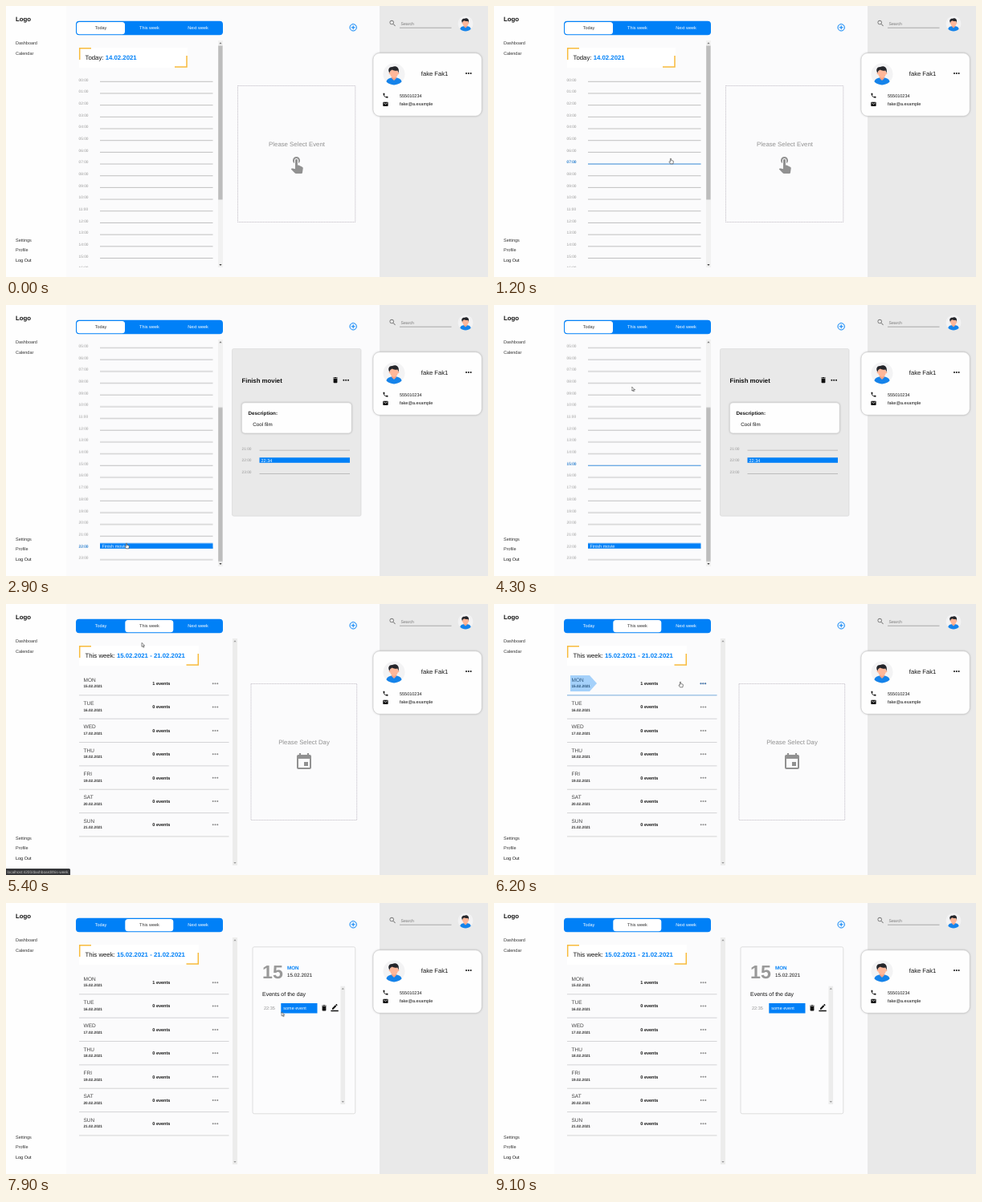
Write an HTML page that moves like this. It is 600 by 338 pixels and loops after 9.9 s.

```html
<!DOCTYPE html>
<html lang="en">
<head>
<meta charset="utf-8">
<title>Event planner</title>
<style>
html, body { margin: 0; width: 100%; height: 100%; overflow: hidden; background: #fbfbfc; }
svg { display: block; width: 600px; height: 338px; }
text { font: 5.5px "Liberation Sans", Arial, sans-serif; fill: #333; text-rendering: geometricPrecision; }
.b { font-weight: bold; }
.t { font-size: 7.8px; }
.m { font-size: 6.25px; }
.hr { font-size: 4.8px; fill: #999; }
.mid { text-anchor: middle; }
.blue { fill: #0080f7; }
.white { fill: #fff; }
.dim { fill: #919191; }
.k, text.k { fill: #111; }
.rule { stroke: #b2b2b2; stroke-width: .8; }
.corner { fill: none; stroke: #f8bb3c; stroke-width: 1.5; }
.dash { fill: none; stroke: #b9b4bd; stroke-width: .7; stroke-dasharray: 1.3 .7; }
.hot .hr { fill: #0080f7; }
.hot .rule { stroke: #2b95f5; }
.soft { filter: drop-shadow(0 .3px .8px #0003); }

.an { animation: 9.9s step-end infinite; }
.today { animation-name: today; }
.week { animation-name: week; }
.pickEvent { animation-name: pickEvent; }
.event { animation-name: event; }
.pickDay { animation-name: pickDay; }
.day { animation-name: day; }
.status { animation-name: status; }
.hand { animation-name: hand; }
.arrow { animation-name: arrow; }
.move { animation: move 9.9s linear infinite; }
.scroll { animation: scroll 9.9s ease-in-out infinite; }
.thumb { animation: thumb 9.9s ease-in-out infinite; }
.h0 { animation: mon 9.9s linear infinite; }
.h1 { animation: tue 9.9s linear infinite; }
.h2 { animation: wed 9.9s linear infinite; }

@keyframes today { 0% { opacity: 1 } 49.4%, 100% { opacity: 0 } }
@keyframes week { 0% { opacity: 0 } 49.4%, 100% { opacity: 1 } }
@keyframes pickEvent { 0% { opacity: 1 } 23.2%, 100% { opacity: 0 } }
@keyframes event { 0% { opacity: 0 } 23.2%, 100% { opacity: 1 } }
@keyframes pickDay { 0% { opacity: 1 } 64.6%, 100% { opacity: 0 } }
@keyframes day { 0% { opacity: 0 } 64.6%, 100% { opacity: 1 } }
@keyframes status { 0% { opacity: 0 } 47.4% { opacity: 1 } 57.5%, 100% { opacity: 0 } }
@keyframes hand {
  0% { opacity: 0 } 6% { opacity: 1 } 39.3% { opacity: 0 } 46.4% { opacity: 1 }
  52.5% { opacity: 0 } 57.5% { opacity: 1 } 69.2%, 100% { opacity: 0 }
}
@keyframes arrow {
  0% { opacity: 0 } 39.3% { opacity: 1 } 46.4% { opacity: 0 } 52.5% { opacity: 1 }
  57.5% { opacity: 0 } 69.2% { opacity: 1 } 89.8%, 100% { opacity: 0 }
}
@keyframes move {
  0%, 6% { transform: translate(238px, 228px) }
  10.6%, 18.2% { transform: translate(220px, 190px) }
  22.2%, 37.4% { transform: translate(150px, 297px) }
  42.4% { transform: translate(168px, 196px) }
  43.3%, 44.4% { transform: translate(171.5px, 102px) }
  47.4%, 51.5% { transform: translate(176px, 27px) }
  54.4%, 55.6% { transform: translate(169px, 48.3px) }
  59.6%, 65.6% { transform: translate(232px, 97px) }
  67.7% { transform: translate(258px, 128px) }
  68.7% { transform: translate(270px, 157px) }
  69.6%, 73.7% { transform: translate(301px, 171.5px) }
  80.8%, 85% { transform: translate(350px, 130px) }
  89.8%, 100% { transform: translate(440px, 30px) }
}
@keyframes scroll { 0%, 13.1% { transform: none } 16.1%, 100% { transform: translateY(-114.3px) } }
@keyframes thumb { 0%, 13.1% { transform: none } 16.1%, 100% { transform: translateY(78.3px) } }
@keyframes mon { 0%, 58% { opacity: 0 } 61%, 65.6% { opacity: 1 } 69.6%, 70.7% { opacity: .27 } 72%, 100% { opacity: 0 } }
@keyframes tue { 0%, 66% { opacity: 0 } 68% { opacity: 1 } 69.6%, 70.7% { opacity: .65 } 74%, 100% { opacity: 0 } }
@keyframes wed { 0%, 67.7% { opacity: 0 } 69.6%, 70.7% { opacity: 1 } 76%, 100% { opacity: 0 } }
/* hour highlights, each started by its own delay */
@keyframes flash { 0%, .8% { opacity: 1 } 1.1%, 100% { opacity: 0 } }
@keyframes linger { 0%, 2.3% { opacity: 1 } 3%, 100% { opacity: 0 } }
@keyframes rest { 0%, 8% { opacity: 1 } 8.6%, 100% { opacity: 0 } }
</style>
</head>
<body>
<svg viewBox="0 0 600 338">
  <defs>
    <clipPath id="view"><rect x="80" y="43" width="182" height="283"/></clipPath>
    <path id="trash" d="M6 19c0 1.1.9 2 2 2h8c1.1 0 2-.9 2-2V7H6v12zM19 4h-3.5l-1-1h-5l-1 1H5v2h14V4z"/>
    <g id="dots"><circle cx="-2.8" r="1"/><circle r="1"/><circle cx="2.8" r="1"/></g>
    <path id="up" d="M-1.6 1 0-1 1.6 1Z"/>
    <path id="down" d="M-1.6-1 0 1 1.6-1Z"/>
    <g id="face">
      <circle r="13.5" fill="#f3f3f4"/>
      <path d="M-9.5 9.6C-9 5.5-5 4.2 0 4.2S9 5.5 9.5 9.6C4.5 14.7-4.5 14.7-9.5 9.6Z" fill="#1583ea"/>
      <path d="M-2.8 2h5.6v3.2L0 8-2.8 5.2Z" fill="#f5a184"/>
      <ellipse cy="-1.2" rx="5" ry="6" fill="#ffb799"/>
      <circle cx="-5.2" cy="-1" r="1.2" fill="#ffb799"/><circle cx="5.2" cy="-1" r="1.2" fill="#ffb799"/>
      <path d="M-5.6-1.6C-8.4-6-5.6-9.6-2-9 1-11 7.4-9.6 5.6-1.6L4.4-4.6Q0-3.6-2.4-5.4L-4.6-4Z" fill="#25262b"/>
    </g>
  </defs>

  <rect width="600" height="338" fill="#fbfbfc"/>
  <rect width="75" height="338" fill="#fefefe"/>
  <rect x="465" width="135" height="338" fill="#e9e9e9"/>

  <text x="12" y="19" class="b t k">Logo</text>
  <text x="12" y="48.4">Dashboard</text>
  <text x="12" y="60.6">Calendar</text>
  <text x="12" y="294">Settings</text>
  <text x="12" y="306.2">Profile</text>
  <text x="12" y="319" class="k">Log Out</text>

  <rect x="87" y="18.7" width="183" height="17.5" rx="4" class="blue"/>
  <g fill="none" stroke="#0080f7" stroke-width="1"><circle cx="432.2" cy="26.8" r="4.2"/><path d="M432.2 24.4v4.8M429.8 26.8h4.8"/></g>

  <path transform="translate(476.2 16.6) scale(.42)" fill="#777" d="M15.5 14h-.79l-.28-.27C15.41 12.59 16 11.11 16 9.5 16 5.91 13.09 3 9.5 3S3 5.91 3 9.5 5.91 16 9.5 16c1.61 0 3.09-.59 4.23-1.57l.27.28v.79l5 4.99L20.49 19l-4.99-5zm-6 0C7.01 14 5 11.99 5 9.5S7.01 5 9.5 5 14 7.01 14 9.5 11.99 14 9.5 14z"/>
  <text x="491.5" y="23.5" style="font-size:5.2px;fill:#777">Search</text>
  <path d="M490 27.2h64.5" stroke="#8c8c8c" stroke-width=".7"/>
  <use href="#face" transform="translate(572 22) scale(.7)"/>

  <rect x="457" y="58.7" width="135.3" height="78.6" rx="8" fill="#fefefe" stroke="#c6c6c6" stroke-width=".6" class="soft"/>
  <use href="#face" x="483" y="85"/>
  <text x="533.5" y="87.4" class="mid k" style="font-size:7.6px">fake Fak1</text>
  <use href="#dots" x="575.8" y="84" class="k"/>
  <path transform="translate(468.5 107.7) scale(.33)" class="k" d="M6.62 10.79c1.44 2.83 3.76 5.14 6.59 6.59l2.2-2.2c.27-.27.67-.36 1.02-.24 1.12.37 2.33.57 3.57.57.55 0 1 .45 1 1V20c0 .55-.45 1-1 1-9.39 0-17-7.61-17-17 0-.55.45-1 1-1h3.5c.55 0 1 .45 1 1 0 1.25.2 2.45.57 3.57.11.35.03.74-.25 1.02l-2.2 2.2z"/>
  <path transform="translate(468.6 118.5) scale(.32)" class="k" d="M20 4H4c-1.1 0-1.99.9-1.99 2L2 18c0 1.1.9 2 2 2h16c1.1 0 2-.9 2-2V6c0-1.1-.9-2-2-2zm0 4l-8 5-8-5V6l8 5 8-5v2z"/>
  <text x="490" y="113.7" class="k">555010234</text>
  <text x="490" y="124" class="k">fake@a.example</text>

  <g class="an today">
    <rect x="88" y="20" width="60" height="15.2" rx="3.5" class="white"/>
    <text x="118" y="28.6" class="mid">Today</text>
    <text x="178.5" y="28.6" class="mid white">This week</text>
    <text x="239" y="28.6" class="mid white">Next week</text>
    <g clip-path="url(#view)"><g class="scroll">
      <rect x="91" y="52" width="135" height="25" class="white"/>
      <path d="M91.7 67V52.8H106M210 76H225V62" class="corner"/>
      <text x="98.5" y="67.4" class="t k">Today: <tspan class="b blue">14.02.2021</tspan></text>
      <g id="hours"></g>
      <rect x="117" y="411.4" width="140.5" height="6.6" class="blue"/>
      <text x="119.5" y="416.6" class="white">Finish movie</text>
    </g></g>
    <rect x="264" y="43" width="6" height="283" fill="#f1f1f1"/>
    <rect x="264.2" y="49.5" width="5.4" height="192" fill="#bdbdbd" class="thumb"/>
    <use href="#up" x="267" y="46.3" fill="#777"/><use href="#down" x="267" y="323" fill="#444"/>

    <g class="an pickEvent">
      <rect x="288.5" y="99.5" width="146.3" height="170" class="dash"/>
      <text x="362" y="175.3" class="t mid dim">Please Select Event</text>
      <path transform="translate(350 185)" class="dim" d="M9 11.24V7.5C9 6.12 10.12 5 11.5 5S14 6.12 14 7.5v3.74c1.21-.81 2-2.18 2-3.74C16 5.01 13.99 3 11.5 3S7 5.01 7 7.5c0 1.56.79 2.93 2 3.74zm9.84 4.63l-4.54-2.26c-.17-.07-.35-.11-.54-.11H13v-6c0-.83-.67-1.5-1.5-1.5S10 6.67 10 7.5v10.74l-3.43-.72c-.08-.01-.15-.03-.24-.03-.31 0-.59.13-.79.33l-.79.8 4.94 4.94c.27.27.65.44 1.06.44h6.79c.75 0 1.33-.55 1.44-1.28l.75-5.27c.01-.07.02-.14.02-.2 0-.62-.38-1.16-.91-1.38z"/>
    </g>
    <g class="an event">
      <rect x="281.5" y="54.6" width="160.5" height="208.6" rx="2" fill="#e9e9e9" stroke="#d6d6d6" stroke-width=".6"/>
      <text x="293.5" y="97" class="b t k">Finish moviet</text>
      <use href="#trash" transform="translate(405.2 88.9) scale(.4)" class="k"/>
      <use href="#dots" x="423.2" y="93.8" class="k"/>
      <rect x="293.3" y="121.8" width="137" height="38.2" rx="4" fill="#fefefe" stroke="#c4c4c4" stroke-width=".6" class="soft"/>
      <text x="301.5" y="137.3" class="b m k">Description:</text>
      <text x="307.3" y="150.6" class="m k">Cool film</text>
      <text x="293.5" y="180.6" class="hr">21:00</text>
      <text x="293.5" y="195.3" class="hr">22:00</text>
      <text x="293.5" y="210" class="hr">23:00</text>
      <path d="M315.5 181.2H428M315.5 210.5H428" class="rule"/>
      <rect x="315.5" y="190.3" width="112.5" height="6.5" class="blue"/>
      <text x="317.5" y="195.5" class="white">22:34</text>
    </g>
  </g>

  <g class="an week">
    <rect x="148.3" y="20" width="60" height="15.2" rx="3.5" class="white"/>
    <text x="118" y="28.6" class="mid white">Today</text>
    <text x="178.5" y="28.6" class="mid">This week</text>
    <text x="239" y="28.6" class="mid white">Next week</text>
    <rect x="91" y="52" width="149" height="25" class="white"/>
    <path d="M91.7 67V52.8H106M224.5 76H239.3V62" class="corner"/>
    <text x="98.5" y="67.4" class="t k">This week: <tspan class="b blue">15.02.2021 - 21.02.2021</tspan></text>
    <g id="days"></g>
    <rect x="282" y="43" width="6" height="283" fill="#ececec"/>
    <use href="#up" x="285" y="46.3" fill="#999"/><use href="#down" x="285" y="323" fill="#999"/>

    <g class="an pickDay">
      <rect x="305" y="99.5" width="131.7" height="170" class="dash"/>
      <text x="371" y="175.3" class="t mid dim">Please Select Day</text>
      <path transform="translate(359 185)" class="dim" d="M17 12h-5v5h5v-5zM16 1v2H8V1H6v2H5c-1.11 0-1.99.9-1.99 2L3 19c0 1.1.89 2 2 2h14c1.1 0 2-.9 2-2V5c0-1.1-.9-2-2-2h-1V1h-2zm3 18H5V8h14v11z"/>
    </g>
    <g class="an day">
      <rect x="307" y="54.8" width="127.8" height="208" rx="2" fill="#fcfcfd" stroke="#d2d2d2" stroke-width=".7"/>
      <text x="319" y="94.2" class="b" style="font-size:23.2px;fill:#999">15</text>
      <text x="350" y="83" class="b m blue">MON</text>
      <text x="350" y="91.8" class="m k">15.02.2021</text>
      <text x="319" y="115.5" class="k" style="font-size:7px">Events of the day</text>
      <text x="321" y="133" class="dim">22:35</text>
      <rect x="342.3" y="125" width="45.2" height="12.5" class="blue"/>
      <text x="345.3" y="132.9" class="white">some event</text>
      <use href="#trash" transform="translate(391.2 126.1) scale(.4)" class="k"/>
      <path transform="translate(404.4 126) scale(.39)" class="k" d="M17.75 7L14 3.25l-10 10V17h3.75l10-10zm2.96-2.96c.39-.39.39-1.02 0-1.41L18.37.29c-.39-.39-1.02-.39-1.41 0L15 2.25 18.75 6l1.96-1.96zM0 20h24v4H0z"/>
      <rect x="416.5" y="103.7" width="5.6" height="147.3" fill="#ececec"/>
      <use href="#up" x="419.3" y="106.8" fill="#999"/><use href="#down" x="419.3" y="248" fill="#999"/>
    </g>
  </g>

  <g class="an status">
    <path d="M0 330H78.5Q80 330 80 331.5V338H0Z" fill="#36373a"/>
    <text x="1.5" y="335.6" style="font-size:4.75px;fill:#c8c8c8">localhost:4200/dashboard/this-week</text>
  </g>

  <g class="move" fill="#fff" stroke="#333" stroke-width=".6" stroke-linejoin="round">
    <path class="an arrow" d="M0 0V5.1L1.2 4 2 5.9 2.9 5.5 2.1 3.7H3.7Z"/>
    <path class="an hand" d="M-.6.4Q0-.4.6.4V2.6L2.9 3.1Q3.5 3.3 3.4 4L2.9 6.8H-.4L-2.1 4.4Q-1.9 3.5-.6 4.4Z"/>
  </g>
</svg>
<script>
const $ = id => document.getElementById(id);
const two = n => String(n).padStart(2, '0');

const hour = (i, attrs = '') => {
  const y = 94.3 + 14.68 * i;
  return `<g ${attrs}><path class="rule" d="M117 ${y}H257.5"/><text class="hr" x="90.5" y="${y - .7}">${two(i)}:00</text></g>`;
};
const glow = (i, start, name = 'flash') =>
  hour(i, `class="hot" style="animation:${name} 9.9s ${start - 9900}ms linear infinite"`);

let hours = '';
for (let i = 0; i < 24; i++) hours += hour(i);
hours += glow(9, 600) + glow(9, 700) + glow(8, 800) + glow(8, 900) + glow(7, 1000, 'rest');
for (let k = 0; k < 7; k++) {
  hours += glow(15 + k, 1800 + 55 * k);
  if (k) hours += glow(15 + k, 4200 - 65 * k);
}
hours += glow(22, 2200, 'rest') + glow(22, 2950, 'rest') + glow(15, 4200, 'linger');
$('hours').innerHTML = hours;

$('days').innerHTML = ['MON', 'TUE', 'WED', 'THU', 'FRI', 'SAT', 'SUN'].map((name, i) => `
  <g transform="translate(0 ${29.36 * i})">
    <path d="M91 113.8H277.5" stroke="#d0d0d2" stroke-width=".9"/>
    <text x="96.5" y="96.5" style="font-size:6.5px;fill:#444">${name}</text>
    <text x="96.5" y="104.2" class="b" style="font-size:4.7px">${15 + i}.02.2021</text>
    <text x="182.3" y="101.1" class="b k">${i ? 0 : 1} events</text>
    <use href="#dots" x="260.5" y="99.2" fill="#8a8a8a"/>
    ${i < 3 ? `<g class="h${i}">
      <path d="M95 89H119L128 99 119 109H95Z" fill="#0080f7" fill-opacity=".34"/>
      <path d="M91 113.8H277.5" stroke="#86bbec" stroke-width="1"/>
      <use href="#dots" x="260.2" y="99.2" fill="#4a80bd"/>
    </g>` : ''}
  </g>`).join('');
</script>
</body>
</html>
```
